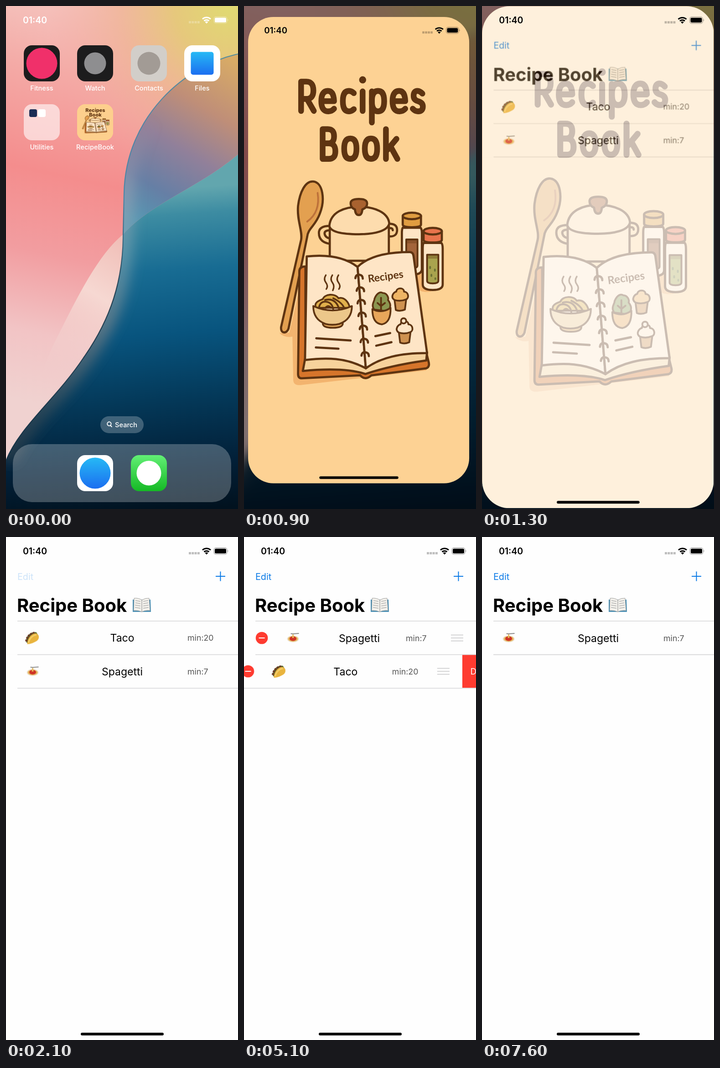
An HTML page that plays this animation: 509x1101 px, repeating every 7700 ms.

```html
<!DOCTYPE html>
<html lang="en">
<head>
<meta charset="utf-8">
<title>Recipe Book</title>
<style>
  :root { --t: 0; }
  html, body { margin: 0; width: 100%; height: 100%; overflow: hidden; background: #000; }
  #stage { position: relative; width: 509px; height: 1101px; overflow: hidden; }
  svg { position: absolute; left: 0; top: 0; width: 509px; height: 1101px; }
  text { font-family: Inter, sans-serif; }
  .mid { text-anchor: middle; }

  /* Every animation is paused; its delay is its start time minus the clock --t. */
  .icons { animation: fade-out 250ms linear calc((600 - var(--t)) * 1ms) forwards paused; }
  .wallpaper { transform-origin: 254px 550px; animation: recede 300ms linear calc((600 - var(--t)) * 1ms) forwards paused; }
  .shade { opacity: 0; animation: fade-half 300ms linear calc((600 - var(--t)) * 1ms) forwards paused; }
  .pressed { animation: press 200ms linear calc((500 - var(--t)) * 1ms) paused; }

  #app {
    position: absolute; left: 0; top: 0; width: 509px; height: 1101px;
    overflow: hidden; opacity: 0; background: #fdd294; transform-origin: 0 0;
    animation:
      show 1ms linear calc((700 - var(--t)) * 1ms) forwards paused,
      open 600ms linear calc((600 - var(--t)) * 1ms) forwards paused,
      settle 1ms linear calc((1400 - var(--t)) * 1ms) forwards paused;
  }
  #list { opacity: 0; animation: show-from 600ms cubic-bezier(.3,0,.4,1) calc((1000 - var(--t)) * 1ms) forwards paused; }
  #bar { position: absolute; left: 164px; bottom: 10px; width: 182px; height: 6px; border-radius: 3px; background: #000; }

  .edit {
    animation:
      tap 500ms ease-in calc((2100 - var(--t)) * 1ms) paused,
      tap 500ms ease-in calc((6900 - var(--t)) * 1ms) paused;
  }
  .shift, .grip {
    animation:
      var(--in, slide) 500ms ease-in-out calc((2100 - var(--t)) * 1ms) forwards paused,
      var(--out, slide-back) 500ms ease-in-out calc((6950 - var(--t)) * 1ms) forwards paused;
  }
  .grip { --in: show-from; --out: fade-out; opacity: 0; }
  .taco .drag { --dy: 73.5px; animation: drag 500ms cubic-bezier(.4,.4,.5,1) calc((3300 - var(--t)) * 1ms) forwards paused; }
  .spagetti .drag { --dy: -73.5px; animation: drag 350ms ease-in-out calc((3450 - var(--t)) * 1ms) forwards paused; }
  .taco .swipe {
    animation:
      swipe 600ms cubic-bezier(.25,.3,.3,1) calc((5000 - var(--t)) * 1ms) forwards paused,
      remove 500ms ease-in-out calc((6050 - var(--t)) * 1ms) forwards paused;
  }
  .last {
    animation:
      swipe 600ms cubic-bezier(.25,.3,.3,1) calc((5000 - var(--t)) * 1ms) forwards paused,
      collapse 500ms ease-in-out calc((6250 - var(--t)) * 1ms) forwards paused;
  }
  .curtain { animation: collapse 500ms ease-in-out calc((6250 - var(--t)) * 1ms) forwards paused; }
  .parting { animation: hide 400ms linear calc((3400 - var(--t)) * 1ms) paused; }

  @keyframes open {
    0% { transform: translate(156px,215px) scale(.155); height: 509px; border-radius: 116px; }
    16.67% { transform: translate(137px,191px) scale(.257); height: 580px; border-radius: 95px; }
    33.33% { transform: translate(59px,90px) scale(.68); height: 880px; border-radius: 68px; }
    50% { transform: translate(9px,24px) scale(.953); height: 1071px; border-radius: 58px; }
    66.67% { transform: translate(2px,6px) scale(.99); height: 1094px; border-radius: 59px; }
    100% { transform: translate(.4px,.4px) scale(.998); height: 1101px; border-radius: 60px; }
  }
  @keyframes settle { from, to { transform: none; border-radius: 0; } }
  @keyframes recede { to { transform: scale(1.12); filter: blur(10px); } }
  @keyframes show { from, to { opacity: 1; } }
  @keyframes show-from { to { opacity: 1; } }
  @keyframes fade-out { to { opacity: 0; } }
  @keyframes fade-half { to { opacity: .47; } }
  @keyframes press { from, to { filter: brightness(.7); } }
  @keyframes tap { from { opacity: .2; } }
  @keyframes slide { to { transform: translateX(var(--dx)); } }
  @keyframes slide-back { to { transform: translateX(0); } }
  @keyframes drag { to { transform: translateY(var(--dy)); } }
  @keyframes swipe { to { transform: translateX(-104px); } }
  @keyframes remove { to { transform: translateX(-509px); } }
  @keyframes collapse { to { transform: translate(0,-73.5px); } }
  @keyframes hide { from, to { visibility: hidden; } }
</style>
</head>
<body>
<div id="stage">
<svg id="home" viewBox="0 0 509 1101">
  <defs>
    <linearGradient id="pink" x1=".3" y1="0" x2=".2" y2="1">
      <stop offset="0" stop-color="#f5c3bd"/><stop offset=".14" stop-color="#f4aaa6"/>
      <stop offset=".34" stop-color="#f48d8d"/><stop offset=".5" stop-color="#f29da0"/>
      <stop offset=".66" stop-color="#f2c4c5"/><stop offset=".8" stop-color="#f0d2d0"/>
    </linearGradient>
    <radialGradient id="gold" gradientUnits="userSpaceOnUse" cx="490" cy="0" r="400">
      <stop offset="0" stop-color="#e0da72"/><stop offset=".3" stop-color="#e6c87c"/>
      <stop offset=".6" stop-color="#efb494" stop-opacity=".75"/><stop offset="1" stop-color="#f3a8a0" stop-opacity="0"/>
    </radialGradient>
    <linearGradient id="lens" gradientUnits="userSpaceOnUse" x1="500" y1="120" x2="290" y2="470">
      <stop offset="0" stop-color="#d8ab66"/><stop offset=".3" stop-color="#bf8e78"/>
      <stop offset=".55" stop-color="#91809a"/><stop offset=".8" stop-color="#667fa5"/><stop offset="1" stop-color="#5596b2"/>
    </linearGradient>
    <linearGradient id="sea" gradientUnits="userSpaceOnUse" x1="370" y1="400" x2="420" y2="1101">
      <stop offset="0" stop-color="#62a6ae"/><stop offset=".08" stop-color="#3d8ca2"/>
      <stop offset=".25" stop-color="#186c93"/><stop offset=".45" stop-color="#08547e"/>
      <stop offset=".66" stop-color="#043858"/><stop offset=".86" stop-color="#021f37"/><stop offset="1" stop-color="#01121f"/>
    </linearGradient>
    <linearGradient id="leaf" gradientUnits="userSpaceOnUse" x1="250" y1="500" x2="70" y2="800">
      <stop offset="0" stop-color="#f0bdb6"/><stop offset=".4" stop-color="#f6d8d2"/><stop offset="1" stop-color="#f0d2d0" stop-opacity="0"/>
    </linearGradient>
    <linearGradient id="edge" gradientUnits="userSpaceOnUse" x1="0" y1="420" x2="0" y2="620">
      <stop stop-color="#3683a6"/><stop offset="1" stop-color="#0d2c40"/>
    </linearGradient>
    <linearGradient id="glow" gradientUnits="userSpaceOnUse" x1="0" y1="250" x2="0" y2="900">
      <stop stop-color="#d8a09c" stop-opacity="0"/><stop offset=".25" stop-color="#a8a4b4" stop-opacity=".5"/>
      <stop offset=".45" stop-color="#8fb0b8" stop-opacity=".5"/><stop offset=".7" stop-color="#8d8a8a" stop-opacity=".6"/>
      <stop offset="1" stop-color="#5a5654" stop-opacity=".4"/>
    </linearGradient>
    <filter id="soft" x="-20%" y="-20%" width="140%" height="140%"><feGaussianBlur stdDeviation="14"/></filter>
    <clipPath id="wave"><path d="M509 105C395 130 262 240 259 410L257 500C257 600 230 685 170 770 110 860 30 920 0 995V1101H509Z"/></clipPath>
    <linearGradient id="green" x2="0" y2="1"><stop stop-color="#62ef75"/><stop offset="1" stop-color="#15b925"/></linearGradient>
    <linearGradient id="blue" x2="0" y2="1"><stop stop-color="#26b9f5"/><stop offset="1" stop-color="#1b6ef0"/></linearGradient>

    <g id="status" fill="currentColor">
      <text x="37" y="38" font-size="19.5" font-weight="600">01:40</text>
      <path d="M401 33h5v5h-5zm6.300 0h5v5h-5zm6.300 0h5v5h-5zm6.300 0h5v5h-5z" opacity=".25"/>
      <path d="M431 28.500a13.500 13.500 0 0 1 18 0M434.500 32.500a8.500 8.500 0 0 1 11 0" fill="none" stroke="currentColor" stroke-width="3"/>
      <path d="M440 38.500l-3.300-3.500a4.600 4.600 0 0 1 6.600 0z"/>
      <rect x="456" y="23.500" width="29" height="14.500" rx="4.500" fill="none" stroke="currentColor" stroke-opacity=".45"/>
      <rect x="458" y="25.500" width="25" height="10.500" rx="2.500"/>
      <path d="M486.500 28.500q2 2.200 0 4.400z" opacity=".5"/>
    </g>

    <path id="e" d="M1 23h28Q28 0 15 0 0 0 0 23 0 46 16 46 24 46 29 40"/>
    <path id="o" d="M0 23Q0 0 14 0 28 0 28 23 28 46 14 46 0 46 0 23Z"/>
    <g id="lettering" transform="translate(-3.500 -4.500) scale(1.012 1.02)" fill="none" stroke="#5e3411" stroke-width="13" stroke-linecap="round" stroke-linejoin="round" role="img" aria-label="Recipes Book">
      <path d="M124 216V150h12Q152 150 152 170 152 189 136 189H124M138 190l15 26"/>
      <use href="#e" x="170" y="171"/>
      <path d="M244 176Q239 171 233 171 219 171 219 194 219 217 233 217 239 217 244 212M264 172V216M264 146v.1M285 172V242"/>
      <use href="#o" x="285" y="171"/>
      <use href="#e" x="332" y="171"/>
      <path d="M400 177Q394 171 389 171 380 171 380 182 380 191 390 194 401 197 401 206 401 217 390 217 383 217 378 211"/>
      <path d="M173 257V324H187Q202 324 202 307 202 289 187 289H173M186 289Q199 289 199 273 199 257 185 257H173"/>
      <use href="#o" x="222" y="278"/>
      <use href="#o" x="269" y="278"/>
      <path d="M317 257V324M341 279L320 304M328 297L343 324"/>
      <path d="M264 146v.1" stroke-width="16"/>
    </g>

    <g id="cupcake" stroke-width="4">
      <path d="M-13 4L-10 28Q0 32 11 27L14 3Z" fill="#cf9250"/>
      <path d="M-13 5C-24-2-14-14-9-14-8-24 9-24 9-14 19-14 22 1 13 4Q0 9-13 5Z" fill="var(--icing, #eeb565)"/>
    </g>
    <g id="jar">
      <path d="M2 35Q0 38 0 48V130Q0 143 23 143 46 143 46 130V48Q46 38 43 35Z" fill="#fee5c6"/>
      <path d="M10 62H36V122Q36 128 23 128 10 128 10 122Z" fill="var(--spice)" stroke-width="4"/>
      <path d="M12 64h22v7H12z" fill="#5e3411" stroke="none" opacity=".35"/>
      <path d="M2 8V28Q2 34 23 34 44 34 44 28V8Z" fill="var(--cap)"/>
      <ellipse cx="23" cy="8" rx="21" ry="7.500" fill="var(--cap)"/>
    </g>
    <g id="kitchen" stroke="#5e3411" stroke-width="5" stroke-linecap="round" stroke-linejoin="round" fill="none">
      <path d="M72 726q14 12 30 8L104 835Q105 848 125 845L410 812 418 795 130 570 95 725ZM375 580h60l-6 48q-30 10-45-8z" fill="#f3b46f" stroke="none"/>
      <path d="M150 378C172 380 178 420 165 452 155 480 138 485 136 505L93 716C89 728 74 728 76 712L122 512C126 492 112 468 115 434 119 402 132 376 150 378Z" fill="#e3a050"/>
      <path d="M160 404Q167 448 136 470" stroke="#bd713a" stroke-width="4"/>
      <path d="M188 480Q163 480 163 496 163 520 196 522M190 490Q176 490 176 497 177 507 190 509M325 475Q343 475 343 489 343 505 325 504M325 485q8-1 8 5"/>
      <path d="M188 482V560H324V478Z" fill="#fdd9a6"/>
      <path d="M187 480C190 448 222 436 255 436 290 436 322 448 325 474 322 492 290 499 255 499 222 499 190 495 187 480Z" fill="#fddcae"/>
      <path d="M236 428Q236 418 255 418 274 418 274 428 274 438 263 442 262 455 255 455 247 455 246 442 236 438 236 428Z" fill="#a9622f"/>
      <use href="#jar" x="354" y="449" style="--cap:#e09d41;--spice:#a3643a"/>
      <use href="#jar" x="402" y="484" style="--cap:#e8744c;--spice:#a9a34e"/>
      <path d="M419 574v3M430 580v3M422 592v3M431 600v2" stroke="#6c7134" stroke-width="4"/>
      <path d="M132 573Q118 573 118 584L115 820Q115 830 124 830L258 823Q270 836 284 823L410 807Q418 804 416 794L410 770 132 780Z" fill="#d6752b"/>
      <path d="M131 786L126 813Q220 804 270 820 330 800 410 789L412 770Z" fill="#f6d29c"/>
      <path d="M135 550C180 545 222 551 252 574L271 807C225 782 180 782 131 788Z" fill="#fee5c6"/>
      <path d="M252 574C280 547 330 540 372 540Q380 540 381 550L412 772C350 772 305 782 271 807Z" fill="#fee5c6"/>
      <path d="M247 600q1-9 9-8t8 9M250 629q1-9 9-8t8 9M252 658q1-9 9-8t8 9M254 687q1-9 9-8t8 9M257 717q1-9 9-8t8 9M259 747q1-9 9-8t8 9M261 778q1-9 9-8t8 9"/>
      <path d="M179 593q-6 9 0 17t1 15M194 593q-6 9 0 17t1 18M208 593q-6 9 0 17t1 15" stroke-width="3.500"/>
      <g stroke-width="4">
        <path d="M156 668C150 654 168 650 172 648 176 636 200 634 208 646 222 642 232 656 234 668Z" fill="#e0b04c"/>
        <path d="M163 668Q166 652 180 654 194 656 196 672M177 650Q202 644 210 672M196 646Q220 658 222 672M178 668q6-8 13 0"/>
        <path d="M172 703Q171 714 195 714 219 714 218 703Z" fill="#e3a95c"/>
        <path d="M150 664Q150 695 178 705 194 709 210 705 239 695 239 664 194 684 150 664Z" fill="#ecc78a"/>
        <path d="M157 738L236 743M156 759L208 762M293 733L327 726M295 755L330 747" stroke-width="5"/>
        <path d="M290 672C282 660 292 652 291 647 297 632 306 631 310 634 320 634 324 645 322 650 332 662 326 672 320 676Z" fill="#8b9650"/>
        <path d="M306 674V645M306 664l-8-7M306 664l9-7"/>
        <path d="M286 671Q286 704 308 706 329 702 328 668 308 682 286 671Z" fill="#e8a65a"/>
      </g>
      <use href="#cupcake" x="350" y="645"/>
      <use href="#cupcake" x="360" y="720" style="--icing:#fee5c6"/>
      <circle cx="358" cy="698" r="6" fill="#fee5c6" stroke-width="4"/>
      <text transform="translate(277 610) rotate(-8)" font-size="24" font-weight="700" style="font-family:Lato,sans-serif" fill="#5e3411" stroke="none">Recipes</text>
    </g>

    <g id="taco-art">
      <path d="M-14 10C-16-4-4-14 8-12L13-4-9 13Z" fill="#55652c"/>
      <path d="M-14 8q2-16 20-19" fill="none" stroke="#6e3925" stroke-width="5" stroke-dasharray="4 2"/>
      <path d="M-12 14C-12 0 0-12 9-9 16-5 14 4 9 7 2 11-4 14-12 14Z" fill="#e9b43e"/>
      <path d="M-9 11C-7 1 1-6 8-6" fill="none" stroke="#f4cf6b" stroke-width="3"/>
    </g>
    <g id="spagetti-art">
      <ellipse cy="2" rx="13" ry="7.500" fill="#eee2cf"/>
      <ellipse cy="2" rx="11" ry="6" fill="#e4b75e"/>
      <ellipse cy="1.500" rx="7.500" ry="5" fill="#cf3325"/>
      <path d="M-2 0L-1-8 1-8 2 0" fill="#e7ba59"/>
      <path d="M-5-9.500L0-9 13-10" fill="none" stroke="#8b8b8b" stroke-width="2"/>
    </g>
    <g id="book-art">
      <path d="M278 137h39l1 27h-40z" fill="#4d93b8"/>
      <path d="M281 134q10-1 17 4 8-5 16-4l2 27q-11-1-18 3-8-4-18-3z" fill="#f3f1ec" stroke="#888" stroke-width=".8"/>
      <path d="M298 138v26M284 139l11 2M284 144l11 2M283 149l12 2M283 154l12 2M301 141l11-2M301 146l11-2M301 151l12-2M301 156l12-2" stroke="#999" stroke-width="1.200"/>
    </g>
  </defs>

  <g class="wallpaper">
    <rect width="509" height="1101" fill="url(#pink)"/>
    <rect width="509" height="420" fill="url(#gold)"/>
    <path d="M257 500C200 545 150 650 100 750L0 995C30 920 110 860 170 770 230 685 257 600 257 500Z" fill="url(#leaf)"/>
    <path d="M509 105C395 130 262 240 259 410L257 500C320 430 420 400 509 325Z" fill="url(#lens)"/>
    <path d="M257 500C320 430 420 400 509 325V1101H0V995C30 920 110 860 170 770 230 685 257 600 257 500Z" fill="url(#sea)"/>
    <g clip-path="url(#wave)">
      <path d="M509 105C395 130 262 240 259 410L257 500C257 600 230 685 170 770 110 860 30 920 0 995" fill="none" stroke="url(#glow)" stroke-width="44" filter="url(#soft)"/>
    </g>
    <path d="M509 105C395 130 262 240 259 410L257 500C257 600 230 685 170 770 110 860 30 920 0 995" fill="none" stroke="url(#edge)" stroke-opacity=".8" stroke-width="2.200"/>
  </g>
  <rect class="shade" width="509" height="1101"/>

  <g class="icons">
    <use href="#status" color="#fff"/>
    <g id="tiles"></g>
    <rect x="51" y="226" width="17" height="17" rx="4" fill="#1b2d55"/>
    <rect x="70" y="226" width="17" height="17" rx="4" fill="#fff"/>
    <g class="pressed">
      <rect x="156" y="215" width="79" height="79" rx="18" fill="#fdcf8d"/>
      <g class="mid" font-size="11" font-weight="800" fill="#5e3411">
        <text x="196" y="232">Recipes</text><text x="196" y="242">Book</text>
      </g>
      <use href="#kitchen" transform="translate(155 209) scale(.16 .083)"/>
    </g>
    <rect x="207" y="898" width="95" height="37" rx="18.500" fill="#fff" fill-opacity=".24"/>
    <path d="M232 921l-3-3a4.300 4.300 0 1 1 .8-.8" fill="none" stroke="#fff" stroke-width="1.800" stroke-linecap="round"/>
    <text x="239" y="922" font-size="14.600" font-weight="500" fill="#fff">Search</text>
  </g>
</svg>

<div id="app">
  <svg viewBox="0 0 509 1101"><use href="#lettering"/><use href="#kitchen"/></svg>
  <svg id="list" viewBox="0 0 509 1101">
    <rect width="509" height="1101" fill="#fefefe"/>
    <text class="edit" x="25" y="93.500" font-size="19.700" fill="#0b7ae6">Edit</text>
    <path d="M470.500 75.500v21M460 86h21" stroke="#0b7ae6" stroke-width="2"/>
    <text x="24" y="164" font-size="40" font-weight="700">Recipe Book</text>
    <use href="#book-art"/>
    <g id="rows"></g>
    <rect class="curtain" y="331" width="509" height="76" fill="#fefefe"/>
    <g stroke="#d6d6d8" stroke-width="1.300">
      <path class="parting" d="M25 184H509M25 257.500H509"/>
      <path class="last" d="M25 331H640"/>
    </g>
  </svg>
  <svg viewBox="0 0 509 1101"><use href="#status"/></svg>
  <div id="bar"></div>
</div>
</div>

<script>
  const LOOP = 7700, STEP = 100;
  const byId = id => document.getElementById(id);

  const circle = (r, fill) => `<circle cx="39.5" cy="39.5" r="${r}" fill="${fill}"/>`;
  const square = (side, fill) =>
    `<rect x="${39.5 - side / 2}" y="${39.5 - side / 2}" width="${side}" height="${side}" rx="5" fill="${fill}"/>`;
  const tile = (x, y, fill, label, mark = '') => `
    <g transform="translate(${x} ${y})">
      <rect width="79" height="79" rx="18" fill="${fill}"/>${mark}
      <text class="mid" x="39.5" y="99" font-size="14.6" font-weight="500" fill="#fff">${label}</text>
    </g>`;

  byId('tiles').innerHTML =
    tile(39, 86, '#1c1c1d', 'Fitness', circle(34, '#f0306a')) +
    tile(156, 86, '#1c1c1d', 'Watch', circle(24, '#8e8e90')) +
    tile(274, 86, '#d2cec9', 'Contacts', circle(25, '#a29b95')) +
    tile(391, 86, '#fff', 'Files', square(50, 'url(#blue)')) +
    tile(39, 215, '#ffffff99', 'Utilities') +
    tile(156, 215, '#fdcf8d', 'RecipeBook') +
    '<rect x="15" y="959" width="479" height="127" rx="42" fill="#fff" fill-opacity=".25"/>' +
    tile(156, 983, '#fff', '', circle(34, 'url(#blue)')) +
    tile(274, 983, 'url(#green)', '', circle(27, '#fff'));

  const row = (name, y, minutes) => `
    <g class="${name.toLowerCase()}" transform="translate(0 ${y})"><g class="drag"><g class="swipe">
      <rect y="-36" width="509" height="72" fill="#fefefe"/>
      <g class="shift" style="--dx:49px"><use href="#${name.toLowerCase()}-art" x="58.5"/></g>
      <text class="shift mid" style="--dx:-2px" x="255" y="8.5" font-size="23">${name}</text>
      <text class="shift" style="--dx:-43px" x="398" y="6.5" font-size="17.8" fill="#555">min:${minutes}</text>
      <g class="shift" style="--dx:55px">
        <circle cx="-16" r="13.3" fill="#fe3b30"/><path d="M-22.5 0h13" stroke="#fff" stroke-width="2"/>
      </g>
      <path class="grip" d="M454-6.500h27M454 0h27M454 6.500h27" stroke="#c6c6c8" stroke-width="1.600"/>
      <rect x="509" y="-36" width="620" height="72" fill="#fe3b30"/>
      <text x="527" y="6.5" font-size="18.500" fill="#fff">Delete</text>
    </g></g></g>`;
  byId('rows').innerHTML = row('Spagetti', 294.5, 7) + row('Taco', 220.5, 20);

  function tick() {
    const t = Math.floor((performance.now() % LOOP) / STEP) * STEP;
    document.documentElement.style.setProperty('--t', t);
    requestAnimationFrame(tick);
  }
  tick();
</script>
</body>
</html>
```
